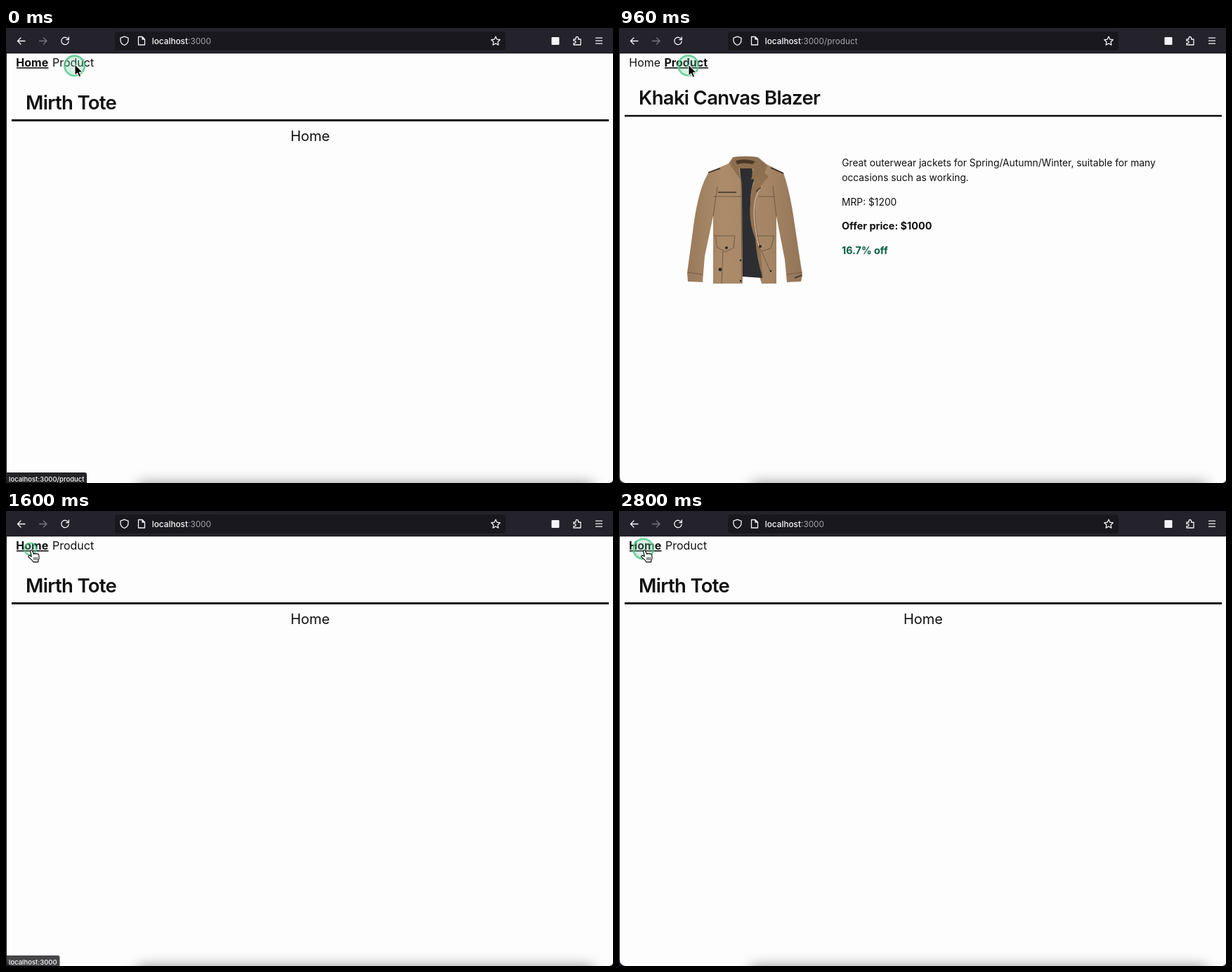
Recreate the animation shown at these times as an HTML page. Size 864 by 648 pixels, loop 3200 ms.

```html
<!DOCTYPE html>
<html lang="en">
<head>
<meta charset="utf-8">
<title>Shop navigation</title>
<style>
html, body { margin: 0; width: 100%; height: 100%; overflow: hidden; background: #fdfdfd; }
svg { display: block; }
text { font-family: Inter, "Noto Sans", sans-serif; fill: #111; white-space: pre; }
.nav { font-size: 16px; }
.on { font-weight: 700; }
.title { font-size: 27.5px; font-weight: 600; letter-spacing: -.025em; }
.body { font-size: 13.8px; }
.body .on { font-size: 14.4px; }
.icon { fill: none; stroke: #f4f4f8; stroke-width: 1.3; stroke-linecap: round; stroke-linejoin: round; }
.seam { fill: none; stroke: #735a43; stroke-width: 1; }
</style>
</head>
<body>
<svg width="864" height="648" viewBox="0 0 864 648">
  <defs>
    <filter id="blur" x="-20%" y="-200%" width="140%" height="500%"><feGaussianBlur stdDeviation="10"/></filter>
    <linearGradient id="cloth">
      <stop offset="0" stop-color="#987a5c"/><stop offset=".3" stop-color="#ab8b6a"/>
      <stop offset=".7" stop-color="#a58565"/><stop offset="1" stop-color="#937557"/>
    </linearGradient>
  </defs>
  <rect width="864" height="648" fill="#fdfdfd"/>

  <g id="home">
    <text class="title" x="28" y="116">Mirth Tote</text>
    <rect x="8" y="130" width="850" height="3" fill="#111"/>
    <text x="433" y="161" font-size="20" text-anchor="middle">Home</text>
  </g>

  <g id="loader">
    <circle cx="433" cy="367" r="12.2" fill="none" stroke="#1b1b1b" stroke-width="3.4"/>
    <rect x="857" y="38" width="6" height="585" rx="3" fill="#777"/>
  </g>

  <g id="product">
    <text class="title" x="28" y="109">Khaki Canvas Blazer</text>
    <rect x="8" y="123.8" width="850" height="2.6" fill="#111"/>
    <g class="body">
      <text x="317.2" y="197">Great outerwear jackets for Spring/Autumn/Winter, suitable for many</text>
      <text x="317.2" y="218">occasions such as working.</text>
      <text x="317" y="253">MRP: $1200</text>
      <text class="on" x="317" y="287">Offer price: $1000</text>
      <text class="on" x="317" y="322" style="fill:#0b5f40">16.7% off</text>
    </g>
    <path fill="url(#cloth)" d="M128 205L156 193L162 184Q180 181 198 184L210 194L234 206Q244 235 250 280L261 352L259 361L239 362L236 330L224 268V364H203L200 354H176L175 364H134V268L122 325L119 362L98 361L97 349L105 290Q112 230 128 205Z"/>
    <path fill="#2c2e31" d="M172 199L189 199L192 217Q186 232 188 258Q190 285 199 315L204 356L176 354L175 230Z"/>
    <path fill="#8f7051" d="M189 207L206 205L213 212Q198 225 194 246Q192 270 201 312L205 357Q196 330 194 300Q184 275 187 250Q186 232 193 220Z"/>
    <path fill="none" stroke="#d8c8b4" stroke-width="1" d="M203 226Q192 238 192 262Q192 280 199 312"/>
    <path fill="#8d6f50" d="M157 193L163 184Q180 182 196 184L211 196L206 209L188 216L192 200H170L174 218Z"/>
    <path fill="#4c3828" d="M166 189Q180 185 194 190L190 194Q178 191 168 194Z"/>
    <path class="seam" d="M134 268L140 226M224 268L219 225M134 240H174M199 240H222M174 218L175 364M134 296H165L163 313L152 319L139 312L138 297M196 296H221L216 314L203 318L197 310M98 348L119 351M239 351L261 348M148 318L146 364M203 318L216 348"/>
    <path stroke="#3c3027" stroke-width="1.6" fill="none" d="M141 234H167M127 206L144 200M216 199L234 207M195 233L202 227M250 356L260 352"/>
    <g fill="#30271f"><circle cx="153" cy="313" r="2"/><circle cx="201" cy="311" r="2"/><circle cx="144" cy="344" r="2.4"/><circle cx="173" cy="331" r="1.3"/><circle cx="173" cy="360" r="1.3"/><circle cx="216" cy="346" r="1.3"/></g>
  </g>

  <text id="homeLink" class="nav" x="14.3" y="55">Home</text>
  <text id="productLink" class="nav" y="55">Product</text>
  <rect id="underline" y="56" height="1.6" fill="#111"/>

  <rect x="188" y="649" width="648" height="30" fill="#000" opacity=".45" filter="url(#blur)"/>
  <path d="M0 36H1V639Q1 647 9 648H0ZM864 643Q864 647 859 648H864Z" fill="#15151b"/>

  <g id="status">
    <path id="statusBox" fill="#232325"/>
    <text id="statusText" x="4" y="645.5" font-size="9.5" font-weight="500" style="fill:#fbfbfe"></text>
  </g>

  <rect width="864" height="36" fill="#24232b"/>
  <rect y="35.3" width="864" height="1" fill="#0d0d11"/>
  <rect x="155" y="5" width="556" height="27" rx="4" fill="#19181e"/>
  <g class="icon">
    <path d="M27 18.5H16.5M21 14L16.5 18.5L21 23"/>
    <path stroke="#77767e" d="M47.5 18.5H58M53.5 14L58 18.5L53.5 23"/>
    <path d="M88.6 16A5.2 5.2 0 1 0 89.2 19M89.4 13V16.6H85.8"/>
    <path d="M168.5 12.2L174 14.2V17.5Q174 22.2 168.5 24.5Q163 22.2 163 17.5V14.2Z"/>
    <path d="M188.5 12.5H194L197.5 16V24H188.5ZM194 12.5V16H197.5"/>
    <path id="star"/>
    <path d="M808 16H811V14.3A1.8 1.8 0 0 1 814.6 14.3V16H818V24H808V21.6H809.5A1.6 1.6 0 0 0 809.5 18.4H808Z"/>
    <path d="M839.5 14.2H848.5M839.5 18.2H848.5M839.5 22.2H848.5"/>
  </g>
  <rect x="776.5" y="13" width="11" height="11" rx="1" fill="#f4f4f8"/>
  <text x="207.7" y="23" font-size="11.8" style="fill:#fbfbfe"><tspan font-weight="500">localhost</tspan><tspan id="path" fill="#a3a3aa"></tspan></text>

  <circle id="ring" stroke="#52c88b" stroke-opacity=".85" fill="#6fce9d" fill-opacity=".28"/>
  <path id="arrow" d="M0 0V15.5L3.6 12.2L6 17.8L8.7 16.6L6.3 11.2H11Z" fill="#000" stroke="#fff" stroke-width="1"/>
  <g id="hand" fill="#fff" stroke="#000" stroke-width="1.1" stroke-linejoin="round">
    <path d="M-1.8 1.4Q-1.4 -.6 .6 .2L3 5.6Q4.2 4.3 5.5 5.3Q6.8 4.3 7.9 5.4Q10 4.8 10.3 7.6L10.6 11Q10.5 13 9.3 14.4V16.8H2.2Q1.6 14.8 -1 12.8L-4.6 9.6Q-5 7.4 -2.8 7.6L-.2 9Z"/>
    <path d="M3.4 10V14M5.6 10V14M7.8 10V14" fill="none" stroke-width=".9"/>
  </g>
</svg>
<script>
const LOOP = 3200, STEP = 80;
const NAV = 640, LOADED = 960, BACK = 1600;
const $ = id => document.getElementById(id);
const clamp = v => Math.max(0, Math.min(1, v));
const ramp = (t, from, to) => clamp((t - from) / (to - from));
const ease = v => v * v * (3 - 2 * v);
const show = (id, on) => $(id).setAttribute("visibility", on ? "visible" : "hidden");
const set = (id, attrs) => {
  for (const name in attrs) $(id).setAttribute(name, attrs[name]);
};

const starPoints = Array.from({ length: 10 }, (_, i) => {
  const angle = (i / 5 - .5) * Math.PI, r = i % 2 ? 3.2 : 6.6;
  return (697 + r * Math.cos(angle)).toFixed(2) + " " + (18.8 + r * Math.sin(angle)).toFixed(2);
});
set("star", { d: "M" + starPoints.join("L") + "Z" });

function drawPage(t) {
  const onProduct = t >= NAV && t < BACK;
  show("home", !onProduct);
  show("loader", onProduct && t < LOADED);
  show("product", onProduct && t >= LOADED);
  $("path").textContent = onProduct ? ":3000/product" : ":3000";
  $("homeLink").classList.toggle("on", !onProduct);
  $("productLink").classList.toggle("on", onProduct);
  set("productLink", { x: onProduct ? 64.4 : 66 });
  set("underline", onProduct ? { x: 65, width: 62 } : { x: 15, width: 45.5 });
}

function drawStatus(t) {
  const first = t < 1000;
  const width = first ? 115 : 76.5;
  const opacity = first
    ? 1 - ramp(t, 600, 800)
    : ramp(t, 1280, 1400) * (1 - ramp(t, 1560, 1800));
  $("statusText").textContent = first ? "localhost:3000/product" : "localhost:3000";
  set("statusBox", { d: `M0 633H${width - 3}Q${width} 633 ${width} 636V648H0Z` });
  set("status", { opacity });
}

function drawPointer(t) {
  const drift = ramp(t, 0, 400);
  const move = ease(ramp(t, 960, 1240));
  const x = 97 + drift - 63 * move - drift * move;
  const y = 53.8 - .4 * drift + .6 * move;
  const click = peak => clamp(1 - Math.abs(t - peak) / 160);
  const press = Math.max(click(NAV), click(BACK));
  set("ring", { cx: x + .6, cy: y, r: 14.2 - 5.7 * press, "stroke-width": 2.6 - .6 * press });

  const overHome = x < 60;
  show("arrow", !overHome);
  show("hand", overHome);
  set("arrow", { transform: `translate(${x + 1} ${y - 2 + drift})` });
  set("hand", { transform: `translate(${x + 2.5} ${y + 1.8})` });
}

const start = performance.now();
function frame() {
  const elapsed = Math.max(0, performance.now() - start) % LOOP;
  const t = Math.floor(elapsed / STEP) * STEP;
  drawPage(t);
  drawStatus(t);
  drawPointer(t);
  requestAnimationFrame(frame);
}
frame();
</script>
</body>
</html>
```
